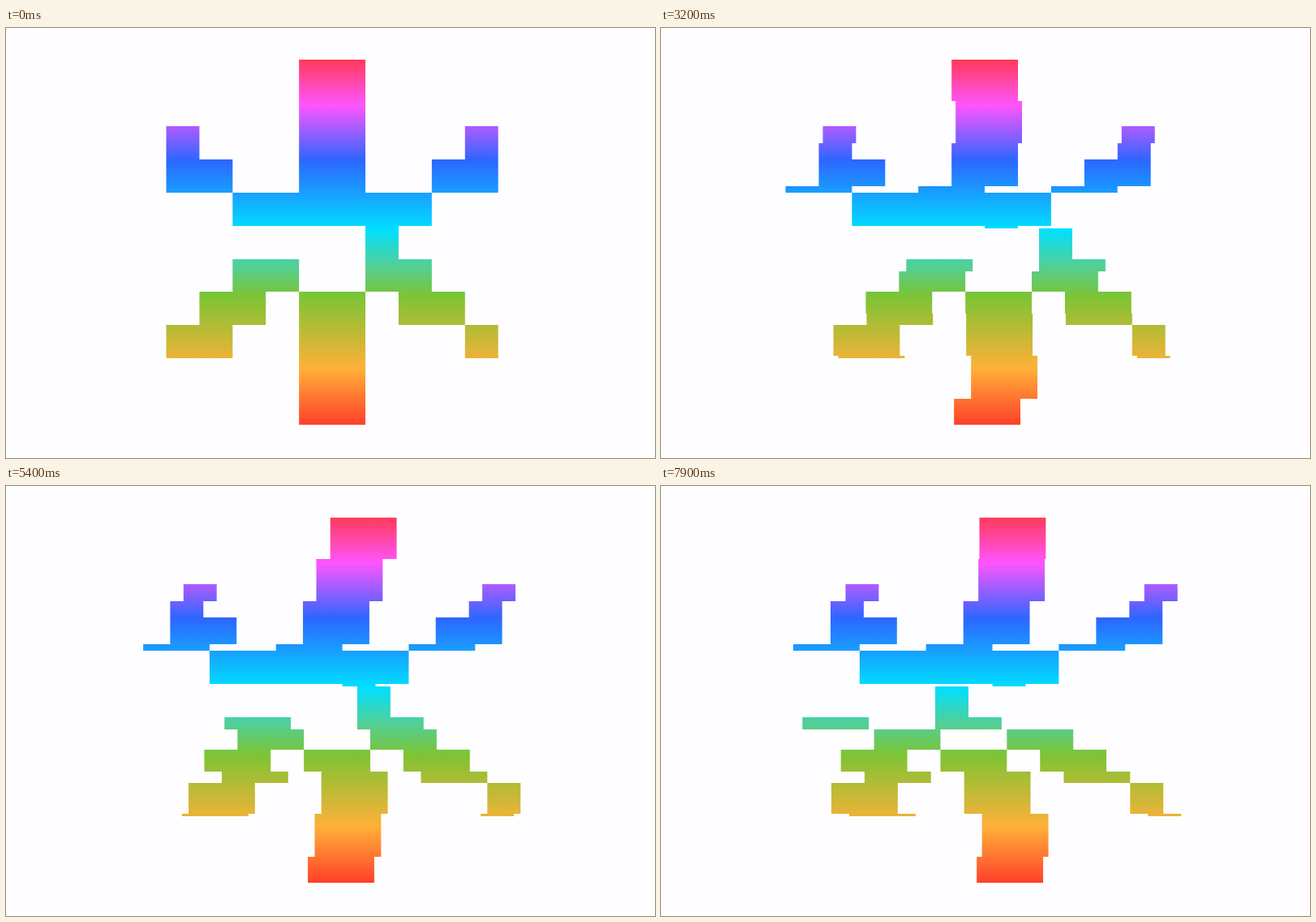
These frames come from a looping animation (800 by 530 pixels, 8000 ms). An HTML page with a canvas:

```html
<!DOCTYPE html>
<html lang="en">
<head>
<meta charset="utf-8">
<title>Drifting rainbow glyph</title>
<style>
  html, body { margin: 0; width: 100%; height: 100%; overflow: hidden; background: #fefdff; }
  canvas { display: block; }
</style>
</head>
<body>
<canvas id="stage" width="800" height="530"></canvas>
<script>
const ctx = document.getElementById('stage').getContext('2d');
const LOOP = 8000, STEP = 100;
const LEFT = 197.5, TOP = 39, CELL = 40.92;
const BAND_TOP = 37.6, BAND = 52.4, BANDS = 9;

const GLYPH = [
  '....##....',
  '....##....',
  '#...##...#',
  '##..##..##',
  '..######..',
  '......#...',
  '..##..##..',
  '.##.##.##.',
  '##..##...#',
  '....##....',
  '....##....'
];

// Key poses: sideways shift of each band, top to bottom
const POSES = [
  { at: 0,    shift: Array(BANDS).fill(0) },
  { at: 1300, shift: [-8.5, 12.5, -15.5, -7.3, 12.5, -8.5, 4, 5, -5] },
  { at: 2100, shift: [-4, 9, -13.5, -11.5, 15.5, -9.5, 2, -1, -2] },
  { at: 3200, shift: [-3, 2, -3, -44, 23, 14, 15, 21, 0] },
  { at: 4700, shift: [35.5, 29, -7.5, -30.5, 5, 9.5, 31.5, 34.5, 9.5] },
  { at: 6200, shift: [42, 12.5, 19, -26, -27.3, 2, 23, 2, 12.5] },
  { at: 7900, shift: [31.3, 30, 11.5, -34.5, -105, -16.7, 12.5, 34.5, 28] }
];

const COLORS = [
  [39, '#ff3a58'], [95, '#ff55ff'], [163, '#2d66ff'], [249, '#00e0ff'],
  [290, '#4ed09e'], [331, '#7cc434'], [420, '#ffb038'], [489, '#ff402a']
];
const rainbow = ctx.createLinearGradient(0, 39, 0, 489);
for (const [y, color] of COLORS) rainbow.addColorStop((y - 39) / 450, color);

const rowY = row => Math.round(TOP + row * CELL);
const bandY = band => Math.round(BAND_TOP + band * BAND);

// Each run of cells becomes one rectangle
const runs = GLYPH.flatMap((line, row) =>
  [...line.matchAll(/#+/g)].map(run => ({
    x: LEFT + run.index * CELL,
    width: run[0].length * CELL,
    top: rowY(row),
    bottom: rowY(row + 1)
  })));

function shiftsAt(time) {
  const i = Math.max(1, POSES.findIndex(pose => pose.at >= time));
  const from = POSES[i - 1], to = POSES[i];
  const part = (time - from.at) / (to.at - from.at);
  return from.shift.map((x, band) => x + (to.shift[band] - x) * part);
}

function draw(time) {
  ctx.fillStyle = '#fefdff';
  ctx.fillRect(0, 0, 800, 530);
  ctx.fillStyle = rainbow;
  shiftsAt(time).forEach((dx, band) => {
    for (const run of runs) {
      const top = Math.max(run.top, bandY(band));
      const bottom = Math.min(run.bottom, bandY(band + 1));
      if (bottom > top) ctx.fillRect(run.x + dx, top, run.width, bottom - top);
    }
  });
}

const start = performance.now();
function tick() {
  const time = (performance.now() - start) % LOOP;
  draw(Math.floor(time / STEP) * STEP);
  requestAnimationFrame(tick);
}
tick();
</script>
</body>
</html>
```
